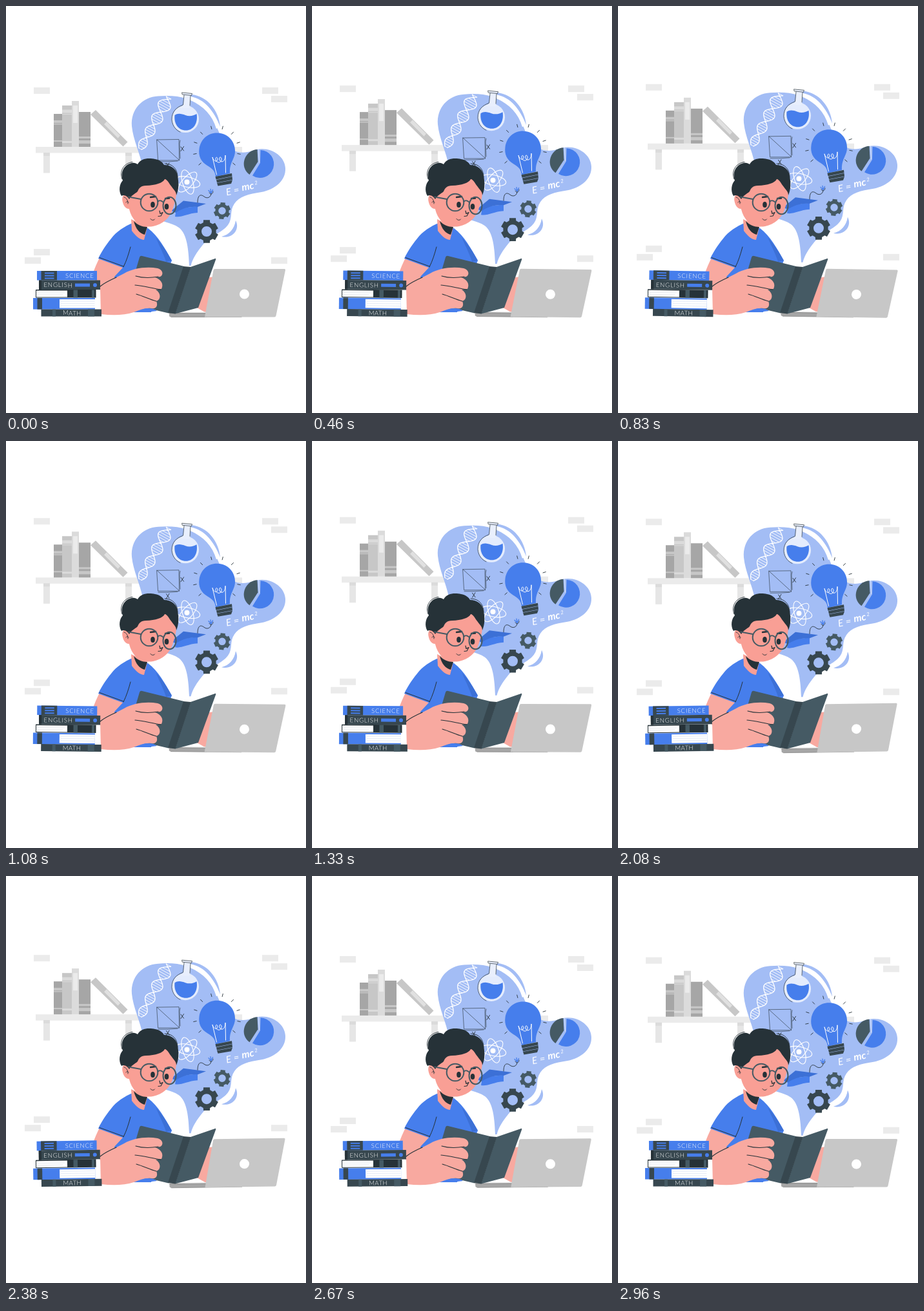
An HTML page with a canvas that plays this animation: 465x630 px, repeating every 3000 ms.

```html
<!DOCTYPE html>
<html lang="en">
<head>
<meta charset="utf-8">
<title>Reading</title>
<style>
html, body { margin: 0; width: 100%; height: 100%; overflow: hidden; background: #fff; }
canvas { display: block; width: 465px; height: 630px; }
</style>
</head>
<body>
<canvas id="stage" width="465" height="630"></canvas>
<script>
const ctx = document.getElementById('stage').getContext('2d');
const LOOP = 3000, RISE = 9.3, TILT = Math.PI / 180;
const BLUE = '#467eec', DEEP = '#3c70d6', SKY = '#a3bdf5', INK = '#263238';
const SLATE = '#37474f', STEEL = '#455a64', SKIN = '#f8a9a0', FACE = '#f99f95';

const cache = {};
const path = d => cache[d] || (cache[d] = new Path2D(d));

function fill(d, color) {
  ctx.fillStyle = color;
  ctx.fill(path(d));
}
function line(d, color, width = 1) {
  ctx.strokeStyle = color;
  ctx.lineWidth = width;
  ctx.stroke(path(d));
}
function box(x, y, w, h, color) {
  ctx.fillStyle = color;
  ctx.fillRect(x, y, w, h);
}
function oval(x, y, rx, ry, color, width, turn = 0) {
  ctx.beginPath();
  ctx.ellipse(x, y, rx, ry, turn, 0, 7);
  if (width) {
    ctx.strokeStyle = color;
    ctx.lineWidth = width;
    ctx.stroke();
  } else {
    ctx.fillStyle = color;
    ctx.fill();
  }
}
function label(s, x, y, font, spacing = 0) {
  ctx.font = font;
  ctx.letterSpacing = spacing + 'px';
  ctx.fillStyle = '#fff';
  ctx.fillText(s, x, y);
}
function within(setup, draw) {
  ctx.save();
  setup();
  draw();
  ctx.restore();
}
const lift = (dy, draw) => within(() => ctx.translate(0, dy), draw);
const spin = (a, x, y, draw) => within(() => {
  ctx.translate(x, y);
  ctx.rotate(a);
  ctx.translate(-x, -y);
}, draw);

function room() {
  for (const [x, y] of [[43, 126], [397, 126], [411, 139], [43, 376], [29, 389], [411, 389]])
    box(x, y, 25, 10, '#ebebeb');
  box(58, 227, 10, 31.5, '#e6e6e6');
  box(185, 227, 10, 31.5, '#e6e6e6');
  box(46, 218, 320, 9.5, '#ebebeb');
  box(58, 227, 10, 5, '#dbdbdb');
  box(185, 227, 10, 5, '#dbdbdb');

  box(74, 167, 13, 51, '#a6a6a6');
  box(74, 177, 13, 4, '#c7c7c7');
  box(74, 182, 13, 1.5, '#c7c7c7');
  box(74, 208, 13, 2, '#c7c7c7');
  box(87, 154, 15, 64, '#c7c7c7');
  box(87, 160.5, 15, 5, '#dbdbdb');
  box(87, 167, 15, 1, '#dbdbdb');
  box(87, 209, 15, 3, '#dbdbdb');
  box(102, 147, 11, 71, '#dbdbdb');
  box(104, 154, 7, 27, '#ebebeb');
  box(113, 164, 18, 54, '#a6a6a6');
  box(113, 202, 18, 3, '#c7c7c7');
  box(113, 208, 18, 5, '#c7c7c7');
  fill('M131 168L139 161L188.500 210.500L181.500 217.500Z', '#c7c7c7');
  fill('M152 183L156 179L177 200.500L173.500 204.500Z', '#e0e0e0');
}

function helix() {
  const at = (u, side) => {
    const amp = (11 - 5 * u) * Math.sin(u * 4 * Math.PI - .38) * side;
    return [252 - 44 * u - .874 * amp, 142 + 79 * u - .486 * amp];
  };
  ctx.strokeStyle = '#fff';
  ctx.lineWidth = 1.3;
  for (const side of [-1, 1]) {
    ctx.beginPath();
    for (let i = 0; i <= 60; i++) ctx.lineTo(...at(i / 60, side));
    ctx.stroke();
  }
  ctx.lineWidth = .9;
  ctx.beginPath();
  for (let i = 0; i <= 24; i++) {
    ctx.moveTo(...at(i / 24, 1));
    ctx.lineTo(...at(i / 24, -1));
  }
  ctx.stroke();
}

function flask() {
  oval(278, 175, 21, 21, '#e4ecfd');
  fill('M273.500 134.500L288.500 135.500L286 139L285 158L271 158L275 152L275.500 138Z', '#e9effd');
  fill('M261.500 169C266 165.500 272 166.500 278 169C285 171.500 291 169.500 295.500 167C298 182 290 192.500 279 192.500C267 192.500 260 182 261.500 169Z', BLUE);
  line('M273 134L288.500 135.500L287.500 138.500L273.500 137ZM276 138L274.500 153C264 157 257 163 257 176C258 187 265 193 270 195M286 139L285 154', INK, .7);
}

function square() {
  line('M234 207L268 206.500L268.500 239L236 239ZM234 207L268.500 238.500M270 208L269 213L270 236M236 241L251 241L266 240', INK, .6);
  line('M271 218L275.500 224M275.500 217.500L271 224.500M248.500 243.500L253 250M253 243L248.500 250.500', INK, .9);
}

function bulb() {
  ctx.strokeStyle = INK;
  ctx.lineWidth = .9;
  ctx.beginPath();
  for (let i = 0; i < 10; i++) {
    const a = (-220.5 + 29 * i) * TILT, c = Math.cos(a), s = Math.sin(a);
    ctx.moveTo(327 + 32.5 * c, 222 + 32.5 * s);
    ctx.lineTo(327 + 37 * c, 222 + 37 * s);
  }
  ctx.stroke();
  fill('M325 264C324 255 320 252 312 247C302 241 298 232 299.500 221C302 206 313 196 328 196.500C344 197 356 210 355 226C354 238 346 243 347 259Z', BLUE);
  line('M326.500 261L320 234C321 240 328 243 328 237C327 231 323 236 326 240C329 244 335 242 334 236C332 231 329 236 332 240C336 243 340 239 340 231L340.500 258', '#fff', 1);
  fill('M324.500 264L350 259L350.500 263.500L325.500 268.500Z', SLATE);
  fill('M326 269L350.500 264L351 269L327 273.500Z', SLATE);
  fill('M327 274L351 269.500L349 275L328.500 278.500Z', SLATE);
}

function pie() {
  fill('M394.500 223A21.500 21.500 0 1 1 382 262.500L394 243Z', BLUE);
  fill('M389.500 222C374 223 366 238 369.500 250C371 255 374 258.500 377.500 261L390.500 241Z', STEEL);
  line('M391.500 222L392.500 242', '#dce6fb', .8);
}

function atom() {
  for (const deg of [12, 72, 132]) oval(281.5, 272.5, 19.5, 8, '#fff', 1.1, deg * TILT);
  oval(280.500, 272.500, 4, 4, '#fff');
}

function cap() {
  fill('M264 314L262 326C272 328 281 321 297 320L297 310Z', BLUE);
  fill('M256 317L275 301.500L310 306L297 311C283 310 272 314 263 320Z', DEEP);
  line('M297 304C297 292 302 291 307 295C312 299 318 296 318 290', INK, .9);
  line('M318 290L314 285.500M318 290L317 283.500M318 290L320.500 284.500', BLUE, 1.3);
  line('M315 289C317 293 321 291 321 287', INK, .8);
}

function gear(x, y, r, hole, color, turn) {
  ctx.beginPath();
  for (let i = 0; i < 6; i++) {
    const a = i * Math.PI / 3 + turn;
    for (const [da, k] of [[-.36, .8], [-.27, 1], [.27, 1], [.36, .8]])
      ctx.lineTo(x + r * k * Math.cos(a + da), y + r * k * Math.sin(a + da));
  }
  ctx.closePath();
  ctx.moveTo(x + hole, y);
  ctx.arc(x, y, hole, 0, 7);
  ctx.fillStyle = color;
  ctx.fill('evenodd');
}

function thought() {
  fill('M284 402C283 378 281 353 268 343C255 334 242 336 230 325L212 250C208 229 197 207 195 186C193 160 211 141 236 139.500C266 137 287 143 305 156C324 171 326 190 336 207C348 227 365 230 382 224C406 215 432 230 433 251C434 270 417 284 396 288C376 291 361 295 354 306C346 317 352 328 344 339C334 352 318 354 304 371C296 381 289 391 286.500 402Z', SKY);
  fill('M287 137C312 139 330 162 332 187C323 163 306 146 286 141Z', SKY);
  fill('M286 140C308 144 323 163 331.500 187L326 190C320 169 306 155 286 146Z', '#fff');
  fill('M356 332C363 345 352 361 334 357C346 354 354 345 356 332Z', SKY);
  helix();
  flask();
  square();
  bulb();
  pie();
  atom();
  spin(-11 * TILT, 342, 293, () => {
    const font = 'Lato, "Open Sans", sans-serif';
    label('E', 342, 293.5, 'italic 15px ' + font);
    label('=', 354, 293, 'italic 15px ' + font);
    label('mc', 367, 291, 'italic bold 15.5px ' + font);
    label('2', 388, 285.5, 'italic 8px ' + font);
  });
  cap();
  gear(311, 349, 18.5, 8, SLATE, Math.PI / 6);
  gear(335, 317, 13.3, 5.8, STEEL, Math.PI / 6 + .1);
}

function body() {
  fill('M146 388C141 397 137 407 134 416L146 440L176 420L182 402Z', SKIN);
  fill('M196 336C184 341 171 349 163 360C154 371 147 382 143 391L181 405L168 419L180 474L225 474L257 394C247 376 236 356 220 344Z', BLUE);
  fill('M232 358C240 376 246 388 248 396L257 394C250 381 242 369 232 358Z', DEEP);
  line('M145 389.500L182 403M193 373C190 384 187 394 182 404', INK, 1);
  fill('M194 330L195 348C202 357 208 362 214 362L219 342Z', FACE);
  fill('M198 333C204 339 211 342 219 342L215 354C207 352 201 345 198 333Z', INK);
}

function head() {
  fill('M190 286C188 300 189 318 198 330C205 340 217 343 228 341C243 338 253 328 257.500 317C261 306 266 293 263 282L247 264L200 272Z', FACE);
  fill('M192 294C184 288 178 294 181 304C183 312 189 316 193 313Z', FACE);
  line('M183 296C187 297 189 301 189 306M186 304C187 302 189 302 190 304', INK, .9);
  fill('M179 294C174 286 176 275 181 270C177 258 182 246 195 243C199 242 202 244 204 245C209 235 222 235 231 237C238 238 243 242 245 246C256 246 265 253 266 263C268 274 268 284 264 293C264 286 258 283 252 273C250 270 248 268 246 268C243 274 232 277.500 217 278C209 278 206 282 204 287C200 291 195 292 191 299C189 296 184 291 179 294Z', INK);
  line('M180 268C175 255 183 243 196 241.500M246 244C258 244 266 252 266 265', INK, .9);

  oval(227.500, 307.500, 3.3, 4.5, INK);
  oval(249, 310.500, 3.3, 4.5, INK);
  line('M224 296L232 295M247 298L253 297.500', INK, 2.4);
  line('M238 317L239 321.500L243 319.500L240 325L236 325.500', INK, 1.2);
  line('M224 329.500C226 332 229 332 230.500 330', INK, 1);
  oval(222, 304, 13.3, 13.3, STEEL, 2);
  oval(253.500, 309, 10, 13.3, STEEL, 2);
  line('M235 303C238 300 241 301 244 304M190 295.500L209 299', STEEL, 1.8);
}

function laptop() {
  fill('M253 475H312V481.500H256Q253 481.500 253 479Z', '#a6a6a6');
  box(253, 473.5, 57, 2, '#ebebeb');
  line('M253 475.500H310', '#737373', .7);
  line('M256 481.500H365', '#8c8c8c', .8);
  fill('M324 407H431.500Q433.500 407 433 409L418.500 479.500Q418 481.500 416 481.500H308L321.500 409Q322 407 324 407Z', '#c7c7c7');
  oval(369.500, 446, 7.5, 7.5, '#fff');
}

function openBook() {
  fill('M211 387L276 403L252 475.500L186 460L207 389Q208 386 211 387Z', STEEL);
  fill('M286 404L324 391Q326 390 325 393L298 467L262 476.500Z', STEEL);
  fill('M275 403L286.500 404L262.500 476.500L251 475Z', SLATE);
}

function hand() {
  fill('M146 436C157 426 170 421 183 414C197 406 217 403 235 406C243 408 245 416 239 419L231 420C240 423 245 430 241 438L232 439C240 444 241 454 233 457C236 463 233 470 225 468C215 467 207 471 198 474C183 479 165 479 147 477Z', SKIN);
  line('M146 434C153 428 162 424 171 420', INK, 1.2);
  line('M201 418C211 421 224 421 236 419M200 432C213 433 226 437 240 439M202 446C213 449 222 454 233 457', INK, 1.1);
  fill('M207 472C213 468 221 467 229 469L234 472L216 474Z', BLUE);
}

function stack() {
  const font = '300 9.6px Lato, "Open Sans", sans-serif';
  box(48, 410, 93, 14.5, BLUE);
  box(54.500, 410, 24.500, 14.500, SLATE);
  for (const y of [412.5, 416.5, 420.5]) box(60, y, 14.5, 2, BLUE);
  label('SCIENCE', 92, 421, font, .8);

  box(51, 424.5, 95, 14.5, SLATE);
  box(51, 424.5, 4, 14.5, INK);
  box(107, 429.5, 23, 5, BLUE);
  oval(138, 432, 3, 3, BLUE);
  label('ENGLISH', 58.5, 435.5, font, .8);

  box(46, 439, 93.5, 12.5, INK);
  box(47, 440.5, 48, 10, '#fff');
  line('M48 444H91M48 447H88', '#d5dae2', .6);
  box(104.500, 439.500, 6.500, 12, STEEL);
  box(133, 439.5, 4, 12, STEEL);

  box(42, 452, 96, 17.5, BLUE);
  box(48.5, 452, 7.5, 17.5, SLATE);
  box(83, 454, 55, 13.5, '#fff');
  line('M85 457H137M85 460.500H137M85 464H137', '#dbe3f3', .7);

  box(54.5, 469.5, 93.5, 11, SLATE);
  box(72, 469.5, 5, 11, STEEL);
  box(127, 469.5, 10, 11, STEEL);
  label('MATH', 88, 478.5, font, .4);
}

// up and back at constant speed
const rise = p => -RISE * (1 - Math.abs(1 - 2 * p));
// 0, +1 at a quarter, -1 at three quarters, back to 0
const sway = p => TILT * (p < .25 ? 4 * p : p < .75 ? 2 - 4 * p : 4 * p - 4);

const start = performance.now();
function frame() {
  const p = (performance.now() - start) % LOOP / LOOP;
  const dy = rise(p), tilt = sway(p);
  box(0, 0, 465, 630, '#fff');
  ctx.lineCap = ctx.lineJoin = 'round';
  lift(dy, room);
  lift(dy, thought);
  body();
  head();
  fill('M314 420L325 419L312 476L296 467Z', SKIN);
  spin(tilt, 343, 444, laptop);
  openBook();
  hand();
  spin(tilt, 95, 445, stack);
  requestAnimationFrame(frame);
}
frame();
</script>
</body>
</html>
```
